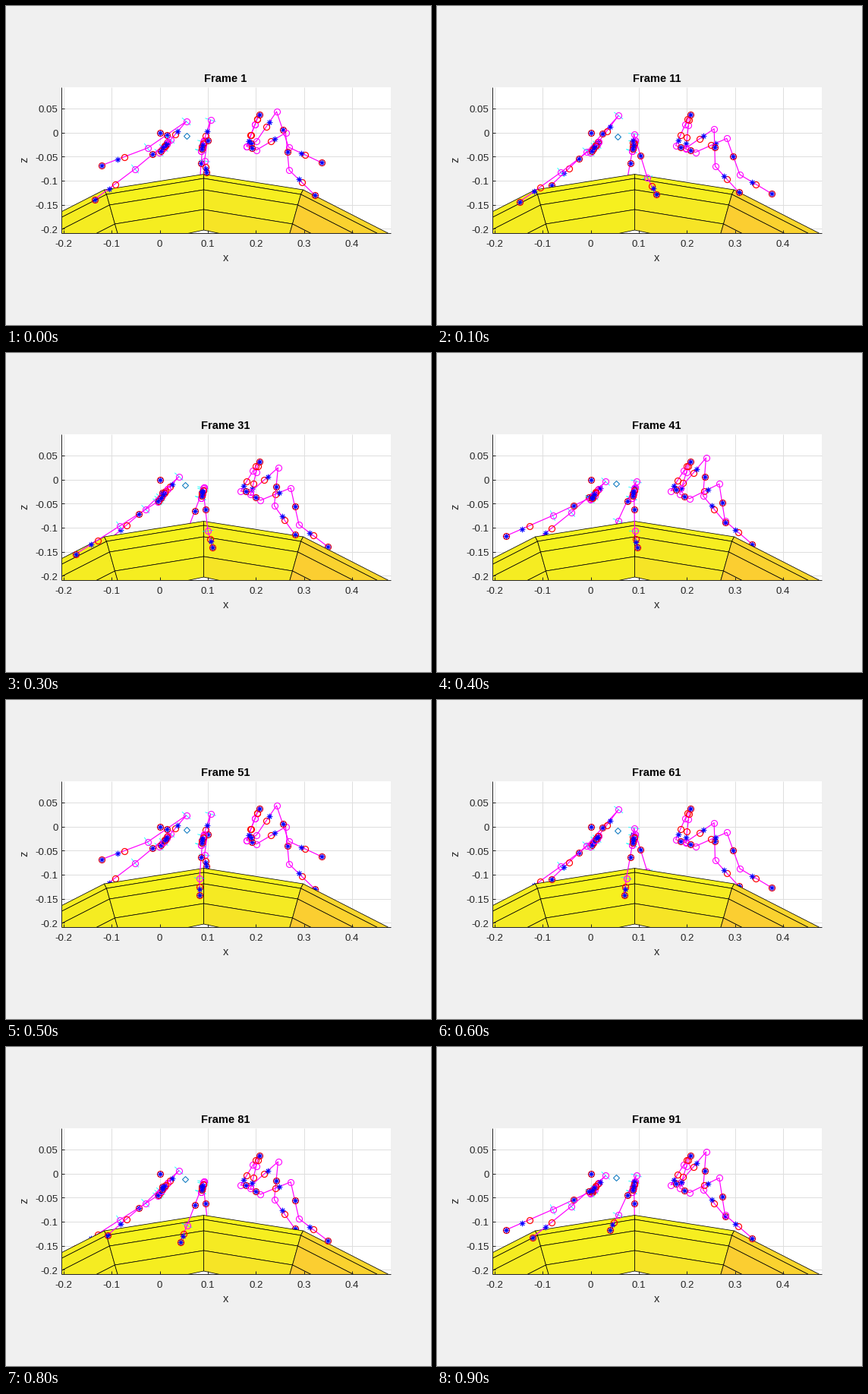
Write a matplotlib script that moves like this. It is 560x420 px and loops after 1000 ms.

```python
import numpy as np
import matplotlib.pyplot as plt
from matplotlib.animation import FuncAnimation
from matplotlib.colors import LinearSegmentedColormap
from matplotlib.patches import Polygon, Rectangle

W, H, DPI = 560, 420, 80
PT = 72 / DPI                      # points per pixel
STEPS = 10
HALF = STEPS // 2
MAGENTA, RED, BLUE, CYAN, INK = "#ff00ff", "#ff0000", "#0000ff", "#00ffff", "#262626"
STAR = (8, 2, 0)

plt.rcParams["font.family"] = "Liberation Sans"
fig = plt.figure(figsize=(W / DPI, H / DPI), dpi=DPI, facecolor="#f0f0f0")
ax = fig.add_axes([0, 0, 1, 1])
ax.set_xlim(0.5, W + 0.5)
ax.set_ylim(H, 0)
ax.axis("off")


def px(x):
    return 203 + 633.5 * x


def pz(z):
    return 166.5 - 633.5 * z


# Gait: a short swing through key poses, then a steady stance back to lift-off
KEY_TIMES = (0, 1, 2, 3, 4, STEPS)


def make_gait(lift, raised, forward, planted, landing_height):
    """Poses are knee, ankle and foot points in pixels."""
    lift, raised, forward, planted = (
        np.array(p, float) for p in (lift, raised, forward, planted))
    landing = planted + (planted - lift) / 6 - (0, landing_height)
    keys = np.array([lift, raised, forward, landing, planted, lift]).reshape(6, -1)

    def pose(time):
        return np.array([np.interp(time % STEPS, KEY_TIMES, k) for k in keys.T]).reshape(-1, 2)
    return pose


left_gait = make_gait(
    lift=[(200, 196), (150, 228), (92, 265)],
    raised=[(208, 188), (153, 214), (91, 241)],
    forward=[(238, 152), (187, 187), (126, 210)],
    planted=[(234, 156), (191, 201), (143, 244)],
    landing_height=5)
middle_gait = make_gait(
    lift=[(260, 180), (239, 235), (230, 257)],
    raised=[(263, 169), (239, 221), (228, 241)],
    forward=[(270, 150), (262, 204), (264, 219)],
    planted=[(260, 177), (272, 234), (281, 256)],
    landing_height=8)
front_gait = make_gait(
    lift=[(359, 151), (354, 201), (381, 239)],
    raised=[(355, 138), (351, 188), (380, 223)],
    forward=[(357, 139), (373, 186), (416, 206)],
    planted=[(379, 183), (393, 231), (433, 258)],
    landing_height=14)


# Upper joints follow the knee and ankle
def left_chain(p):
    kx, ky = p[0]
    hip = np.array([max(202, 203 + 0.4 * (kx - 225)), min(193, 191 - 0.27 * (167 - ky))])
    return np.vstack([(213, 179), hip + (4, -5), hip, p])


def middle_chain(p):
    return np.vstack([(261, 177), (259, 185), (257, 191), p])


def front_chain(p):
    hip = np.array([322 + 0.4 * (p[1, 0] - 352), 183 + 0.41 * (p[0, 1] - 151)])
    shift = hip[0] - 323
    coxa = (326 + 0.33 * shift, 155.5 + 0.1 * shift)
    return np.vstack([coxa, (310 + shift, 182 + 0.35 * shift), hip, p])


def rings(z, color=RED, width=1.2):
    return ax.plot([], [], "o", mec=color, mfc="none", ms=8 * PT, mew=width * PT, zorder=z)[0]


def asterisks(z):
    return ax.plot([], [], ls="", marker=STAR, mec=BLUE, ms=7.4 * PT, mew=0.9 * PT, zorder=z)[0]


class Leg:
    def __init__(self, gait, chain, start, shin_star, z):
        self.gait, self.chain, self.start = gait, chain, start
        self.front = chain is front_chain
        self.stars_at = np.array([0.75, 0.5, 0.63, 0.5, shin_star])[:, None]
        self.axes = ax.plot([], [], color=CYAN, lw=0.8 * PT, zorder=z)[0]
        self.bones = ax.plot([], [], color=MAGENTA, lw=1.2 * PT, zorder=z + 0.1)[0]
        self.ends = rings(z + 0.2, MAGENTA, 1.1)
        self.joints = rings(z + 0.3)
        self.stars = asterisks(z + 0.4)

    def draw(self, step):
        pts = self.chain(self.gait(step - self.start))
        a, b = pts[:-1], pts[1:]
        joints = np.vstack([(a + b) / 2, pts[-1:]])
        stars = np.vstack([a + (b - a) * self.stars_at, pts[-1:]])
        line = pts
        if self.front:
            root = np.array([[334, 142]])
            line = np.vstack([root, pts])
            joints = np.vstack([joints, (root + pts[:1]) / 2])
        else:
            ticks = []
            for p, q in zip(pts[1:-2], pts[2:-1]):
                d = q - p
                n = np.array([-d[1], d[0]]) / np.hypot(*d) * 7
                ticks += [q - n, q + n, (np.nan, np.nan)]
            self.axes.set_data(*np.array(ticks).T)
        self.bones.set_data(*line.T)
        self.ends.set_data(*pts[:-1].T)
        self.joints.set_data(*joints.T)
        self.stars.set_data(*stars.T)


# Plot box and grid
left, right, top, bottom = 73, 507, 107, 298.5
box = dict(xy=(left, top), width=right - left, height=bottom - top)
ax.add_patch(Rectangle(**box, fc="white", ec="none", zorder=0))
clip = Rectangle(**box, transform=ax.transData)


def label(x, y, text, size, **kw):
    kw = {"ha": "center", "va": "center", "color": INK, **kw}
    return ax.text(x, y, text, fontsize=size * PT, zorder=9, **kw)


def rule(xs, ys, color, z):
    ax.plot(xs, ys, color=color, lw=PT, zorder=z, solid_capstyle="butt")


for i in range(-2, 5):
    x = px(i / 10)
    rule([x, x], [top, bottom], "#dedede", 0.5)
    rule([x, x], [bottom, bottom - 4], INK, 8)
    label(x, 314, f"{i / 10:g}", 13.3)
for i in range(-4, 2):
    y = pz(i / 20)
    rule([left, right], [y, y], "#dedede", 0.5)
    rule([left, left + 4], [y, y], INK, 8)
    label(69, y + 1, f"{i / 20:g}", 13.3, ha="right", va="center_baseline")
rule([left, left], [top, bottom], INK, 8)
rule([left, right], [bottom, bottom], INK, 8)
label(290, 332.5, "x", 14.67)
label(25, 202.5, "z", 14.67, rotation=90)
title = label(290, 96, "", 14.67, color="black", weight="bold")

# Ground: each ring is (ridge height, shoulder offset, shoulder height)
MIDDLE = 261
RINGS = [(221.5, 131, 242), (227, 128, 248), (242, 124, 262),
         (268, 117, 287), (295, 108, 318)]
heat = LinearSegmentedColormap.from_list("heat", ["#fdc635", "#f7db2b", "#f5eb22", "#f7f61a"])
SECTOR_HEAT = [(0.72, 0.02), (0.95, 0.07), (0.88, 0.12), (0.25, 0.06)]


def ring_points(ring):
    ridge, dx, y = ring
    outer = y + 0.51 * (300 - dx)
    return [(MIDDLE - 300, outer), (MIDDLE - dx, y), (MIDDLE, ridge),
            (MIDDLE + dx, y), (MIDDLE + 300, outer)]


for n, (hi, lo) in enumerate(zip(RINGS, RINGS[1:])):
    p, q = ring_points(hi), ring_points(lo)
    for s, (base, fall) in enumerate(SECTOR_HEAT):
        cell = Polygon([p[s], p[s + 1], q[s + 1], q[s]], fc=heat(base - fall * n),
                       ec="black", lw=0.75 * PT, joinstyle="round", zorder=4)
        ax.add_patch(cell)
        cell.set_clip_path(clip)
hole = Polygon(ring_points(RINGS[-1])[1:4], fc="white", ec="none", zorder=3.9)
ax.add_patch(hole)
hole.set_clip_path(clip)

# Far legs stand behind the ground, near legs in front, half a cycle apart
legs = []
for gait, chain, start, star in [(left_gait, left_chain, 3, 0.65),
                                 (middle_gait, middle_chain, 8, 0.65),
                                 (front_gait, front_chain, 3, 0.38)]:
    legs.append(Leg(gait, chain, start + HALF, star, 2))
    legs.append(Leg(gait, chain, start, star, 5))

# Fixed anchors and the swaying centre of mass
for artist in (rings(6), asterisks(6)):
    artist.set_data([203, 334], [166.5, 142.5])
centre = ax.plot([], [], "D", mec="#0072bd", mfc="none", ms=6.2 * PT, mew=PT, zorder=6)[0]


def update(step):
    title.set_text(f"Frame {10 * step + 1}")
    for leg in legs:
        leg.draw(step)
    turn = 2 * np.pi / HALF
    centre.set_data([237.3 + 1.2 * np.cos(turn * (step - 0.7))],
                    [172.6 - 1.3 * np.cos(turn * (step - 0.1))])
    return []


anim = FuncAnimation(fig, update, frames=STEPS, interval=100, repeat=True,
                     repeat_delay=0, blit=False)
plt.show()
```
